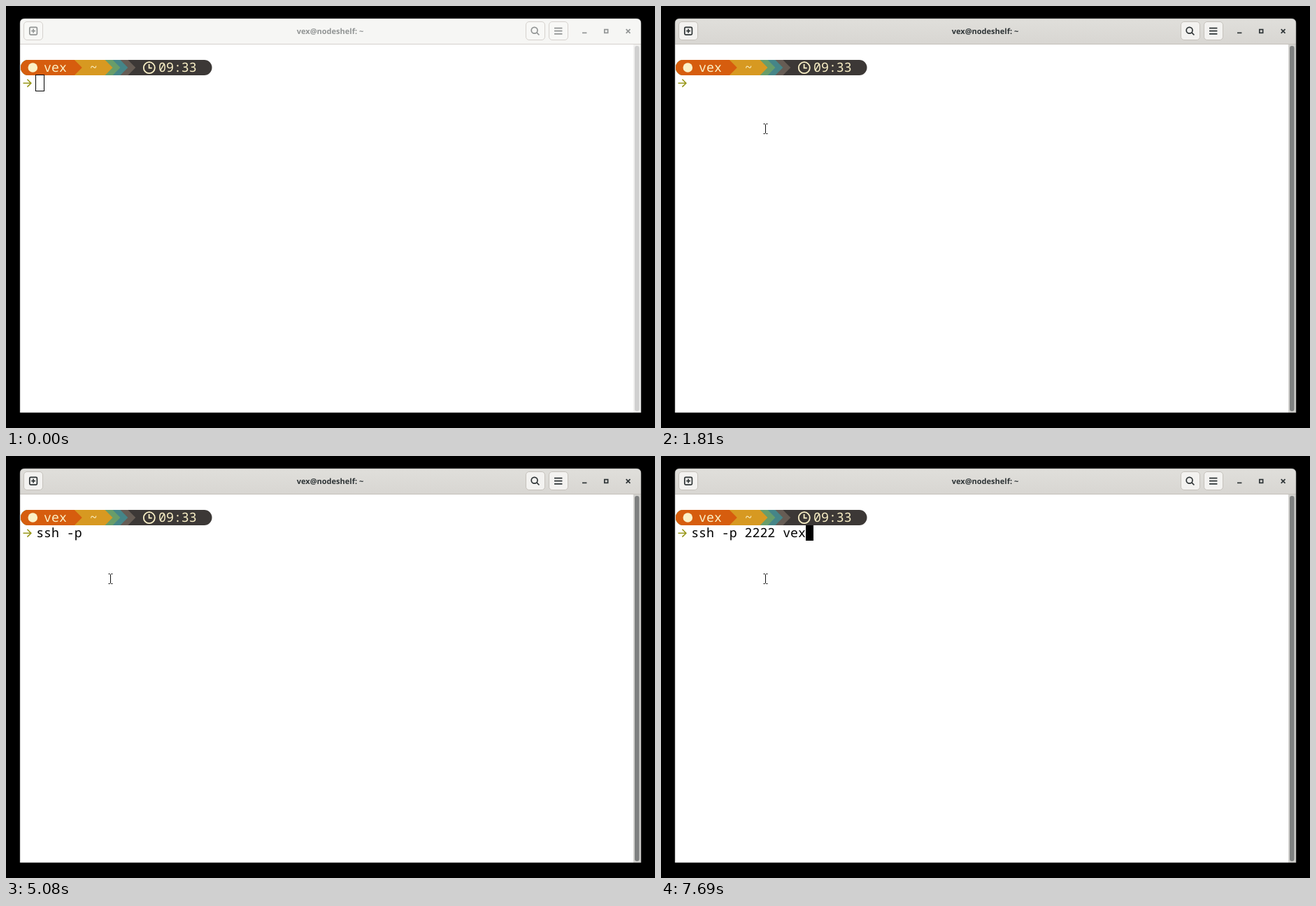
Write an HTML page that moves like this. It is 928 by 603 pixels and loops after 8000 ms.

```html
<!DOCTYPE html>
<html lang="en">
<head>
<meta charset="utf-8">
<title>Terminal</title>
<style>
  html, body { margin: 0; width: 100%; height: 100%; overflow: hidden; background: #000; }
  svg { display: block; width: 928px; height: 603px; text-rendering: geometricPrecision;
    --fg: #929595; --line: #d5d1cd; --bar-top: #f6f6f4; --bar-bottom: #f6f6f4;
    --button: #f8f8f6; --track: #f1f0ef; }
  svg.focused { --fg: #2e3436; --line: #c5c1bb; --bar-top: #e0dfdb; --bar-bottom: #d8d6d2;
    --button: #f3f2f0; --track: #d2d1ce; }
  .bar-top { stop-color: var(--bar-top); }
  .bar-bottom { stop-color: var(--bar-bottom); }
  .line { fill: var(--line); }
  .button { fill: var(--button); stroke: var(--line); }
  .icon { fill: none; stroke: var(--fg); stroke-width: 1.7; }
  .title { font: bold 11px "Noto Sans", sans-serif; fill: var(--fg); text-anchor: middle; }
  .mono { font: 18.2px "Noto Sans Mono", monospace; white-space: pre; }
  .cream { fill: #fbf1c7; }
</style>
</head>
<body>
<svg id="stage" viewBox="0 0 928 603">
  <defs>
    <linearGradient id="header" x2="0" y2="1">
      <stop class="bar-top"/><stop class="bar-bottom" offset="1"/>
    </linearGradient>
  </defs>

  <path d="M20 581V25q0-7 7-7H901q7 0 7 7V581Z" fill="#fff"/>
  <path d="M20 54V25q0-7 7-7H901q7 0 7 7V54Z" fill="url(#header)"/>
  <rect class="line" x="20" y="54" width="888" height="1"/>
  <rect x="897" y="55" width="11" height="526" fill="var(--track)"/>
  <rect id="slider" x="899" y="57" width="6.5" height="522" rx="3.2" fill="#2e3436"/>
  <path d="M20 581V25q0-7 7-7H901q7 0 7 7V581Z" fill="none" stroke="#808080" stroke-opacity=".5"/>

  <g class="button">
    <rect x="25.5" y="22.5" width="27" height="26" rx="4.5"/>
    <rect x="743.5" y="22.5" width="27" height="26" rx="4.5"/>
    <rect x="776.5" y="22.5" width="27" height="26" rx="4.5"/>
  </g>
  <g class="icon">
    <rect x="33.8" y="30.3" width="10.6" height="10.8" rx="1.6"/>
    <path d="M36.2 35.7h5.8M39.1 32.8v5.8"/>
    <circle cx="755.6" cy="34.7" r="4.4"/>
    <path d="M758.8 37.9l3.6 3.6"/>
    <path d="M784 31.6h11.4M784 35.7h11.4M784 39.8h11.4"/>
    <path d="M824 38.4h6.4"/>
    <rect x="855.8" y="33.6" width="4.8" height="4.8"/>
    <path d="M886.7 33.1l5.8 5.8M892.5 33.1l-5.8 5.8"/>
  </g>
  <text class="title" x="463.5" y="40">vex@nodeshelf: ~</text>

  <path d="M100 77H283.5a11 11 0 0 1 0 22H100Z" fill="#3c3836"/>
  <g id="segments"></g>
  <circle class="cream" cx="38.3" cy="88" r="6.8"/>
  <g class="mono cream">
    <text x="54.1" y="94">vex</text>
    <text x="119.7" y="94">~</text>
    <text x="218.1" y="94">09:33</text>
  </g>
  <g fill="none" stroke="#fbf1c7" stroke-width="1.8">
    <circle cx="204.8" cy="88.2" r="8"/>
    <path d="M204.6 83v5.6h4.2"/>
  </g>
  <path d="M24.5 110.2H36M30.4 104.8L35.8 110.2L30.4 115.6" fill="none" stroke="#98971a" stroke-width="1.6"/>

  <text id="command" class="mono" x="43.2" y="116"></text>
  <rect id="hollow" x="42.5" y="98.5" width="12" height="23" fill="none" stroke="#000"/>
  <rect id="block" y="99" width="11" height="22"/>
  <path id="pointer" d="M-3-7h2L0-6L1-7h2M0-6V6M-3 7h2L0 6L1 7h2" fill="none" stroke="#111"/>
</svg>
<script>
  const LOOP = 8000, FOCUS = 1240, BLINK = 570, FRAME = 80;
  const CELL = 10.93, LEFT = 43.2;
  const $ = id => document.getElementById(id);
  const clamp = v => Math.min(1, Math.max(0, v));
  const mix = (a, b, p) => a + (b - a) * p;
  const column = n => LEFT + n * CELL;

  // Each segment ends in an arrow tip one cell wide; the rightmost lies lowest.
  const segments = { 12: "#665c54", 11: "#458588", 10: "#689d6a", 9: "#d79921", 5: "#d65d0e" };
  $("segments").innerHTML = Object.entries(segments).reverse().map(([end, colour]) =>
    `<path fill="${colour}" d="M32 77H${column(end)}l${CELL} 11l${-CELL} 11H32a11 11 0 0 1 0-22Z"/>`).join("");

  // Words are typed in bursts; slow is added to the gap after every key.
  const words = [
    { text: "ssh ", start: 2630, gap: 160, slow: 80 },
    { text: "-p ", start: 4100, gap: 240, slow: -80 },
    { text: "2222 ", start: 5330, gap: 200, slow: 70 },
    { text: "vex", start: 7370, gap: 160, slow: 0 }
  ];
  const keys = words.flatMap(({ text, start, gap, slow }) => [...text].map((char, i) =>
    ({ char, time: start + gap * i + slow * i * (i - 1) / 2 })));

  const entry = [190, 212], pause = [164.5, 164.5], rest = [149.5, 175.5];

  function pointerAt(t) {
    const time = FOCUS + Math.floor((t - FOCUS) / FRAME) * FRAME;
    const arrive = 1 - (1 - clamp((time - 840) / 320)) ** 2;
    const leave = clamp((time - FOCUS) / 160);
    return pause.map((p, i) => mix(mix(entry[i], p, arrive), rest[i], leave));
  }

  function draw(t) {
    const focused = t >= FOCUS;
    const typed = keys.filter(key => key.time <= t);
    const lastInput = typed.length ? typed.at(-1).time : FOCUS;
    const lit = Math.floor((t - lastInput) / BLINK) % 2 === 0;

    $("stage").classList.toggle("focused", focused);
    $("slider").setAttribute("opacity", mix(.17, .51, focused ? clamp((t - 1080) / 200) : 0));
    $("command").textContent = typed.map(key => key.char).join("");
    $("hollow").setAttribute("visibility", focused ? "hidden" : "visible");
    $("block").setAttribute("visibility", focused && lit ? "visible" : "hidden");
    $("block").setAttribute("x", Math.round(column(typed.length)));
    $("pointer").setAttribute("visibility", t >= 920 ? "visible" : "hidden");
    $("pointer").setAttribute("transform", `translate(${pointerAt(t)})`);
  }

  const start = performance.now();
  function tick() {
    draw((performance.now() - start) % LOOP);
    requestAnimationFrame(tick);
  }
  tick();
</script>
</body>
</html>
```
